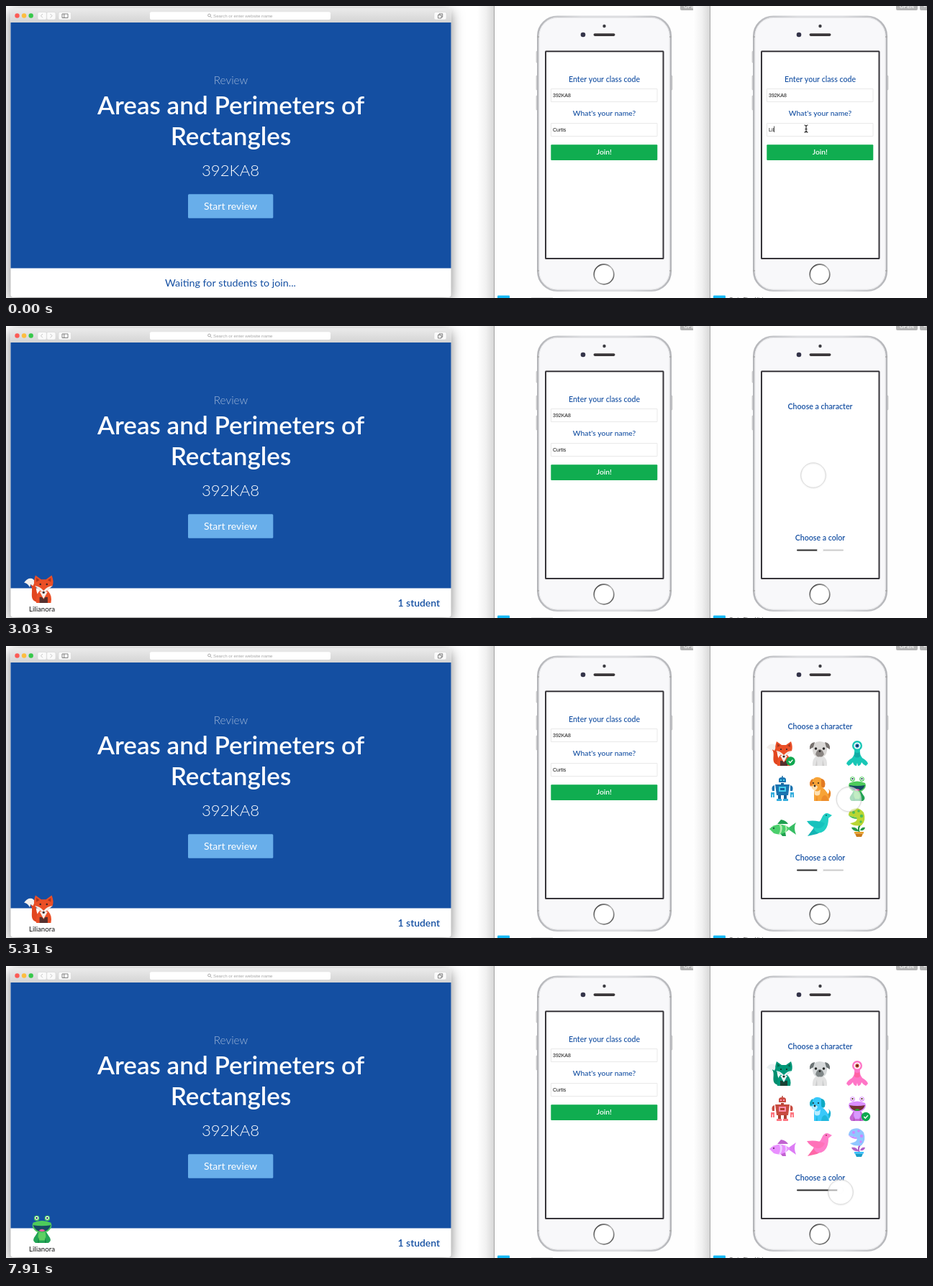
Recreate the animation shown at these times as an HTML page with a canvas. Size 1280 by 407 pixels, loop 8 s.

```html
<!DOCTYPE html>
<html lang="en">
<head>
<meta charset="utf-8">
<title>Class review</title>
<style>
html, body { margin: 0; width: 100%; height: 100%; overflow: hidden; background: #fff; }
canvas { display: block; width: 100vw; height: 100vh; }
</style>
</head>
<body>
<canvas id="stage" width="1280" height="407"></canvas>
<script>
const LOOP = 8000, JOINED = 3030, STEP = 152.4;
const BLUE = '#144fa2', GREEN = '#10ad50';
const LATO = 'Lato, sans-serif', ARIAL = '"Liberation Sans", sans-serif';
const NAME = 'Lilianora', OTHER = 'Curtis', CODE = '392KA8';

const stage = document.getElementById('stage').getContext('2d');
let g = stage;

function layer() {
  const c = document.createElement('canvas');
  c.width = 1280;
  c.height = 407;
  return c.getContext('2d');
}

function drawOn(ctx, fn) {
  const old = g;
  g = ctx;
  fn();
  g = old;
}

function box(x, y, w, h, fill, r = 0, stroke, lw = 1) {
  g.beginPath();
  g.roundRect(x, y, w, h, r);
  if (fill) { g.fillStyle = fill; g.fill(); }
  if (stroke) { g.strokeStyle = stroke; g.lineWidth = lw; g.stroke(); }
}

function disc(x, y, r, fill, stroke, lw = 1) {
  g.beginPath();
  g.arc(x, y, r, 0, 7);
  if (fill) { g.fillStyle = fill; g.fill(); }
  if (stroke) { g.strokeStyle = stroke; g.lineWidth = lw; g.stroke(); }
}

function trace(d, stroke, lw = 1) {
  g.strokeStyle = stroke;
  g.lineWidth = lw;
  g.stroke(new Path2D(d));
}

function text(s, x, y, font, fill, align = 'center') {
  g.font = font;
  g.fillStyle = fill;
  g.textAlign = align;
  g.fillText(s, x, y);
}

function fade(x0, y0, x1, y1, ...colors) {
  const f = g.createLinearGradient(x0, y0, x1, y1);
  colors.forEach((c, i) => f.addColorStop(i / (colors.length - 1), c));
  return f;
}

// Linear value along [key, ...values] rows
function along(rows, k) {
  if (k <= rows[0][0]) return rows[0].slice(1);
  for (let i = 1; i < rows.length; i++) {
    const a = rows[i - 1], b = rows[i];
    if (k <= b[0]) {
      const u = (k - a[0]) / (b[0] - a[0]);
      return a.slice(1).map((v, j) => v + (b[j + 1] - v) * u);
    }
  }
  return rows[rows.length - 1].slice(1);
}

// ---- characters: layers of [colour, path] around the centre ----
const dot = (x, y, r) => `M${x - r} ${y}a${r} ${r} 0 1 0 ${2 * r} 0a${r} ${r} 0 1 0 ${-2 * r} 0Z`;
const rect = (x, y, w, h) => `M${x} ${y}h${w}v${h}h${-w}Z`;

const cast = {
  fox: [
    ['#e2461f', 'M-5 16C-18 14-9 1-14-5L-11-9C-6-5-8 2-5 7Z'],
    ['#f3efec', 'M-22-8C-18-15-10-15-9-9L-11-4L-14-6L-15-2Q-17-7-22-8Z'],
    ['#ea4f27', 'M-7 17Q-8 8-3 2H7Q13 8 11 17Z'],
    ['#f3efec', 'M-3 3H7L2 12Z'],
    ['#54302e', 'M-3 17V10Q1 9 2 13Q3 9 7 10V17Z'],
    ['#ea4f27', 'M-8-17L-1-12H5L12-17Q15-9 13-4L2 5L-9-4Q-11-9-8-17Z'],
    ['#a93620', 'M-7-14L-3-11L-7-9ZM11-14L7-11L11-9Z'],
    ['#f3efec', 'M-9-4Q-3-4 2 2Q7-4 13-4L2 5Z'],
    ['#3a2326', dot(-2, -6, 1.1) + dot(6, -6, 1.1) + dot(2, 4, 1.5)]
  ],
  pug: [
    ['#e2e2e2', 'M-10 17Q-11 4 0 2Q11 4 10 17Z'],
    ['#cbcac9', 'M-4 8L-3.5 17H-6ZM4 8L3.5 17H6Z'],
    ['#dad8d6', 'M-9-14Q0-20 9-14Q12-2 7 3Q0 7-7 3Q-12-2-9-14Z'],
    ['#77726f', 'M-7-16Q-15-15-14-6L-9-9ZM7-16Q15-15 14-6L9-9Z'],
    ['#8a8582', 'M-6 1Q-4-6 0-6Q4-6 6 1Q3 6 0 4Q-3 6-6 1Z'],
    ['#2c2a2a', dot(-5.5, -7, 1.8) + dot(5.5, -7, 1.8) + dot(0, -3.5, 1.5)]
  ],
  alien: [
    ['#19c7b6', 'M-4-6H4Q3 1 7 6Q14 10 15 14L12 17Q8 15 6 12Q5 17 1 17L0 13L-1 17Q-5 17-6 12Q-8 15-12 17L-15 14Q-14 10-7 6Q-3 1-4-6Z'],
    ['#12aaa4', 'M-3-2Q0 0 3-2L4 4Q0 7-4 4Z'],
    ['#19c7b6', dot(0, -11, 7)],
    ['#f2fbfb', dot(0, -11, 4.6)],
    ['#1c6fae', dot(0, -11, 2.7)],
    ['#14304e', dot(0, -11, 1.3)]
  ],
  robot: [
    ['#14639d', rect(-.7, -18, 1.4, 3) + rect(-2, -8, 4, 3) + rect(-6, 8, 4, 8) + rect(2, 8, 4, 8)],
    ['#1b74b0', 'M-5-9V-13Q-5-16 0-16Q5-16 5-13V-9ZM-10-6H10L8 9H-8ZM-11-5V3H-14Q-16-4-11-5ZM11-5V3H14Q16-4 11-5Z'],
    ['#35aede', 'M-16 5H-11V12H-13V8H-14V12H-16ZM16 5H11V12H13V8H14V12H16ZM-8 14H-1V17H-8ZM1 14H8V17H1Z'],
    ['#47cfee', rect(-5, -3, 10, 7) + rect(-3, -13, 2, 2) + rect(1, -13, 2, 2)],
    ['#14639d', rect(-3, -1, 6, 3)]
  ],
  dog: [
    ['#e88628', 'M9 9Q15 6 12 0Q18 5 13 14Z'],
    ['#f7a336', 'M-8 17V4L-5-2H3Q13 4 13 17Z'],
    ['#ed8c2a', 'M2 17Q3 8 8 9Q12 12 12 17ZM-4 8L-3 17H-5.5Z'],
    ['#fde0b2', 'M-8 1Q-4 6 1 1L0 8Q-4 11-7 8Z'],
    ['#f7a336', 'M-11-12Q-4-20 4-13Q6-4 2 0Q-4 4-10 0Q-13-4-11-12Z'],
    ['#e27a22', 'M2-14Q9-13 7-3Q4 1 2-4ZM-10-14Q-16-10-13-3L-10-6Z'],
    ['#fde0b2', 'M-11-3Q-7-8-3-3Q-4 2-7 2Q-10 2-11-3Z'],
    ['#3b2a22', dot(-9, -8, 1.1) + dot(-2, -8, 1.1) + dot(-7, -4, 1.4)]
  ],
  frog: [
    ['#23a455', 'M-8 17Q-13 14-8 8L-5 3H5L8 8Q13 14 8 17Z'],
    ['#5fd062', 'M-4 4H4Q6 11 3 14H-3Q-6 11-4 4Z'],
    ['#168846', 'M-4 10L-3.5 17H-5.5ZM4 10L3.5 17H5.5Z'],
    ['#4dcb5b', dot(-6.5, -13.5, 3.3) + dot(6.5, -13.5, 3.3) + 'M-11-8Q0-13 11-8Q14-2 7 3Q0 6-7 3Q-14-2-11-8Z'],
    ['#fff', dot(-6.5, -13.8, 2.2) + dot(6.5, -13.8, 2.2)],
    ['#16324c', dot(-6.5, -13.8, 1.1) + dot(6.5, -13.8, 1.1)],
    ['#164a63', 'M-11-5Q0-3 11-5Q8 3 0 3Q-8 3-11-5Z'],
    ['#ee5ba1', 'M-4 2Q0-2 4 2Q0 4-4 2Z']
  ],
  fish: [
    ['#1f9f50', 'M-7 1L-2-5Q5-4 8 1ZM-4 13L0 18H5L4 12Z'],
    ['#36bd63', 'M9 6L19-1Q15 6 19 16L9 9Z'],
    ['#4bcf6c', 'M-18 8Q-6-4 11 7Q0 19-12 14Z'],
    ['#b4ecb0', 'M-5 1Q-1 8-5 15L-3 15Q2 8-2 1ZM3 2Q6 8 3 13L5 12Q8 8 5 3Z'],
    ['#17643c', dot(-12, 7, 1.2)]
  ],
  bird: [
    ['#13b3b3', 'M-7 5L-17 18L-4 15L6 10Z'],
    ['#21cfc4', 'M17-11L13-13Q8-16 4-10L1-4L-9 6Q-6 15 2 13Q12 9 12-7Z'],
    ['#17c2bd', 'M7 0Q-4-5-18-3Q-13 5-4 7Q4 8 7 0Z'],
    ['#0f5560', dot(9, -11, .9)]
  ],
  plant: [
    ['#27984a', 'M7 1Q1 6 4 13H2Q-1 5 4 1ZM2 11Q-6 12-8 6Q-1 5 2 11ZM4 10Q6 5 11 6Q10 11 4 10Z'],
    ['#b9d633', 'M-8-19Q2-24 9-15Q13-4 6 3Q-4 5-10 0Q2-2-1-8Q-7-9-12-11Q-12-16-8-19Z'],
    ['#4ebf55', dot(-5, -15, 2) + dot(2, -17, 1.8) + dot(6, -10, 2.2) + dot(5, -2, 1.7) + 'M-12-11Q-7-9-1-8L0-6Q-8-6-12-11Z'],
    ['#e9a22b', 'M-4 12H9V14.5H-4Z'],
    ['#ca7b1a', 'M-3 14.5H8L6 19H-1Z']
  ]
};

function character(key, x, y, size = 1) {
  g.save();
  g.translate(x, y);
  g.scale(size, size);
  for (const [color, d] of cast[key]) {
    g.fillStyle = color;
    g.fill(new Path2D(d));
  }
  g.restore();
}

// ---- fixed scenery ----
function browser() {
  g.save();
  g.shadowColor = 'rgba(0,0,0,.5)';
  g.shadowBlur = 17;
  g.shadowOffsetY = 5;
  box(6.5, 3, 612, 403, '#fff', 4);
  g.restore();
  box(6.5, 3, 612, 20, fade(0, 3, 0, 23, '#ebebeb', '#d4d4d4'), [4, 4, 0, 0]);
  ['#fc5b55', '#fdbd3e', '#35c84a'].forEach((c, i) => disc(15.5 + 9.6 * i, 13.5, 3.2, c));
  for (const [x, w] of [[44, 12.3], [56.7, 12.3], [73, 17.5], [595, 17]])
    box(x, 8.5, w, 10.5, '#fafafa', 2, '#d0d0d0', .5);
  trace('M51 11L48.5 13.7L51 16.4M61.5 11L64 13.7L61.5 16.4', '#b9b9b9', .8);
  trace('M78 11H86V16.5H78ZM80.8 11V16.5M600.5 12.5H605V17H600.5ZM602 12.5V10.8H606.7V15.3H605', '#666', .8);
  box(200, 8.3, 251, 10.7, '#fff', 2);
  disc(282.5, 13, 1.9, null, '#888', .7);
  trace('M284 14.5L286 16.6', '#888', .7);
  text('Search or enter website name', 288, 16, '6.2px ' + ARIAL, '#a5a5a5', 'left');

  box(6.5, 23, 612, 342.6, BLUE);
  text('Review', 312.5, 109, '300 15.3px ' + LATO, 'rgba(255,255,255,.6)');
  text('Areas and Perimeters of', 312.5, 151, '600 35.1px ' + LATO, '#fff');
  text('Rectangles', 312.5, 194, '600 35.1px ' + LATO, '#fff');
  text(CODE, 312, 237, '300 22.2px ' + LATO, '#fff');
  box(253, 262.3, 118.3, 33.5, '#68aeea', 1.5);
  text('Start review', 312, 284, '14px ' + LATO, '#fff');
}

function phone() {
  g.save();
  g.fillStyle = fade(655, 0, 679, 0, '#fff', '#f1f1f1', '#d6d6d6');
  g.fillRect(655, 0, 24, 407);
  box(679, 0, 301, 407, '#fefefe');
  box(678, 0, 1, 407, '#a3a3a3');
  box(937, -4, 30, 10, '#b5b5b5', 2);
  box(970, -4, 12, 10, '#b5b5b5', 2);
  text('OPEN', 952, 3, 'bold 7px ' + ARIAL, '#eee');
  text('+', 977, 3, 'bold 7px ' + ARIAL, '#eee');
  box(683, 403.5, 17, 5, '#14b9f5', 1);

  const metal = fade(738, 0, 925, 0, '#b4b5b9', '#dcdde0', '#dcdde0', '#b4b5b9');
  for (const [x, y, h] of [[737, 63, 16], [737, 97, 20], [737, 125, 20], [923.5, 97, 20]])
    box(x, y, 2.5, h, '#d9d9dc', 1, '#aaa', .5);
  box(739.3, 14.8, 184.5, 382, '#f8f8fa', 27, metal, 2.6);
  box(741, 16.5, 181, 378.5, null, 25.5, '#e8e8ea', 1);
  trace('M738 43H741M922 43H925M738 369H741M922 369H925', '#aaa', 1.5);
  disc(831.5, 28, 2.2, '#3d3d42');
  disc(802, 40, 3.3, '#35354a');
  box(816.5, 38.3, 30, 3.6, '#3a3638', 1.8);
  disc(831, 374, 13.8, '#fff', fade(818, 362, 844, 388, '#333', '#bbb', '#444'), 1.7);
  box(750, 63.3, 163.5, 288.6, '#fff', .5, '#37353a', 2);
  g.restore();
}

function joinForm(name, dy = 0) {
  text('Enter your class code', 831.5, 106 + dy, '500 10.6px ' + LATO, BLUE);
  box(757.5, 115.5, 147.5, 18, '#fff', 0, '#e9e9e9');
  text(CODE, 760, 127 + dy, '7px ' + ARIAL, '#111', 'left');
  text("What's your name?", 831.5, 153 + dy, '500 10.4px ' + LATO, BLUE);
  box(757.5, 163.5, 147.5, 18, '#fff', 0, '#e9e9e9');
  text(name, 760, 174.5, '7px ' + ARIAL, '#111', 'left');
  box(757.3, 193.3, 148, 21.7, GREEN, 1);
  text('Join!', 831.3, 207 + dy, '600 10.3px ' + LATO, '#fff');
}

const scenery = layer(), grid = layer();
drawOn(scenery, () => {
  g.fillStyle = '#fff';
  g.fillRect(0, 0, 1280, 407);
  browser();
  phone();
  trace('M730 406.5H760', '#ddd');
  joinForm(OTHER);
  g.translate(300, 0);
  phone();
  text('Go to Checklist', 705, 411, '7px ' + ARIAL, '#444', 'left');
});
drawOn(grid, () => Object.keys(cast).forEach((key, i) =>
  character(key, 1079 + 52 * (i % 3), 150 + 49 * Math.floor(i / 3) - (i > 5 ? 1 : 0))));

// ---- moving parts ----
const typed = t => t < 350 ? 3 : t < 650 ? 4 : t < 800 ? 5 : t < 950 ? 7 : 9;
const caretOn = t => t < 150 || (t >= 350 && t < 1540) || (t >= 1990 && t < 2440);

const touchPath = [
  [0, 1122, 208], [7, 1122, 208], [10, 1149, 219], [13, 1159, 222], [15, 1184, 205],
  [17, 1184, 205], [20, 1141, 306], [22, 1143, 313], [27, 1152, 315], [32, 1160, 315]
];
const knobPath = [[21, 1131.5], [27, 1146], [32, 1159.5]];

function touch(x, y, alpha) {
  disc(x, y, 17.3, `rgba(255,255,255,${alpha})`);
  g.save();
  g.shadowColor = 'rgba(0,0,0,.22)';
  g.shadowBlur = 2;
  g.shadowOffsetY = .7;
  disc(x, y, 17.3, null, 'rgba(200,200,200,.65)', .9);
  g.restore();
}

function typing(t) {
  const name = NAME.slice(0, typed(t));
  g.save();
  g.translate(300, 0);
  joinForm(name, -.3);
  if (caretOn(t)) {
    g.font = '7px ' + ARIAL;
    box(760.3 + g.measureText(name).width, 167.5, .8, 8.5, '#222');
  }
  g.restore();
  if (t < 1240) {
    trace('M1109.5 166Q1112 166 1112 168V174Q1112 176 1109.5 176M1114.5 166Q1112 166 1112 168M1112 174Q1112 176 1114.5 176M1110.5 171.5H1113.5', '#222', 1.1);
  } else {
    const x = t < 1390 ? 1129 : t < 1540 ? 1126 : 1123;
    touch(x, t < 1540 ? 206 : 205, t < 2440 ? .22 : .32);
  }
}

function tick(x, y) {
  disc(x, y, 6.2, '#10a850');
  trace(`M${x - 2.7} ${y}l2 2.1l3.6-4`, '#fff', 1.4);
}

function choosing(step) {
  const [knob] = along(knobPath, step);
  text('Choose a character', 1131.5, 116, '600 10.6px ' + LATO, BLUE);
  if (step >= 1) {
    g.save();
    g.filter = `hue-rotate(${(knob - 1131.5) * 360 / 65}deg)`;
    g.drawImage(grid.canvas, 0, 0);
    g.restore();
    if (step < 16) tick(1090.5, 160.5);
    else tick(1195, 210);
  }
  text('Choose a color', 1131.5, 299, '600 10.6px ' + LATO, BLUE);
  box(1099, 311.4, knob - 1099, 2.2, '#2b2b2b', 1);
  box(knob, 311.4, 1164 - knob, 2.2, '#cbcbcb', 1);
  disc(knob, 312.6, 4.3, '#fff', 'rgba(0,0,0,.04)', .5);
  const [x, y] = along(touchPath, step);
  touch(x, y, .62);
}

function draw(t) {
  const step = Math.max(0, Math.floor((t - JOINED) / STEP));
  g.drawImage(scenery.canvas, 0, 0);
  if (t < JOINED) {
    text('Waiting for students to join...', 312, 391.3, '14.3px ' + LATO, BLUE);
  } else {
    character(step < 16 ? 'fox' : 'frog', 50, 366.8, 1.13);
    text(NAME, 50, 398, '9.7px ' + LATO, '#111');
    text('1 student', 603, 391, '600 13.9px ' + LATO, BLUE, 'right');
  }
  if (t < 2730) typing(t);
  else choosing(step);
}

const start = performance.now();
function frame() {
  draw((performance.now() - start) % LOOP);
  requestAnimationFrame(frame);
}
frame();
</script>
</body>
</html>
```
